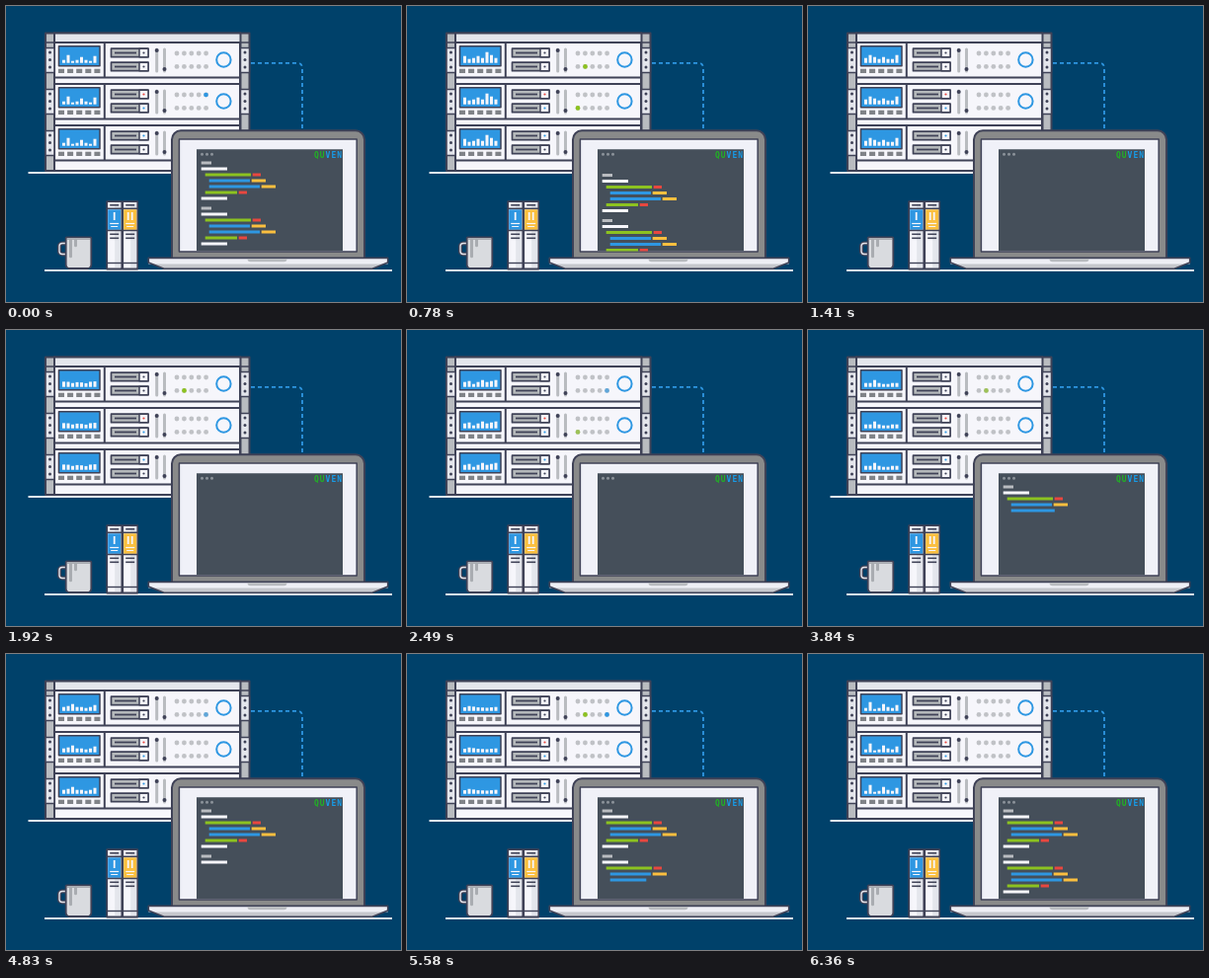
These frames come from a looping animation (400x300 px, 6.39 s). An HTML page with a canvas:

```html
<!DOCTYPE html>
<html lang="en">
<head>
<meta charset="utf-8">
<title>Server and laptop</title>
<style>
html, body { margin: 0; width: 100%; height: 100%; overflow: hidden; background: #00416a; }
canvas { display: block; width: 400px; height: 300px; }
</style>
</head>
<body>
<canvas id="stage" width="400" height="300"></canvas>
<script>
const ctx = document.getElementById('stage').getContext('2d');
const LOOP = 6390, STEP = 30;
const NAVY = '#00416a', INK = '#3f4257', WHITE = '#f6f6fb', PALE = '#e4e6ec';
const GREY = '#b9bcc0', BLUE = '#2e97e2', GREEN = '#8cc220', ORANGE = '#fbbf3f', RED = '#e8473f';
const SCREEN = '#454f5a', DARK = '#808388';

function box(x, y, w, h, fill, stroke, r = 0, lw = 2) {
  ctx.beginPath();
  ctx.roundRect(x, y, w, h, r);
  if (fill) { ctx.fillStyle = fill; ctx.fill(); }
  if (stroke) { ctx.strokeStyle = stroke; ctx.lineWidth = lw; ctx.stroke(); }
}

function dot(x, y, r, fill, stroke, lw = 2) {
  ctx.beginPath();
  ctx.arc(x, y, r, 0, Math.PI * 2);
  if (fill) { ctx.fillStyle = fill; ctx.fill(); }
  if (stroke) { ctx.strokeStyle = stroke; ctx.lineWidth = lw; ctx.stroke(); }
}

function line(points, color, lw = 2, cap = 'butt') {
  ctx.beginPath();
  points.forEach(([x, y], i) => i ? ctx.lineTo(x, y) : ctx.moveTo(x, y));
  ctx.strokeStyle = color;
  ctx.lineWidth = lw;
  ctx.lineCap = cap;
  ctx.stroke();
}

const across = (x1, x2, y, color, lw) => line([[x1, y], [x2, y]], color, lw);

// Piecewise linear lookup over [time, value] pairs.
function track(keys, t) {
  if (t <= keys[0][0]) return keys[0][1];
  for (let i = 1; i < keys.length; i++) {
    const [a, u] = keys[i - 1], [b, v] = keys[i];
    if (t <= b) return u + (v - u) * (t - a) / (b - a);
  }
  return keys[keys.length - 1][1];
}

// ---- Equalizer bars ----
const POSES = [
  [0,    [3, 8, 2, 3, 6, 3, 2, 7]],
  [780,  [7, 4, 5, 7, 5, 11, 8, 5]],
  [1410, [5, 8, 6, 4, 6, 4, 4, 8]],
  [2490, [5, 6, 3, 5, 7, 5, 6, 7]],
  [3840, [4, 4, 7, 4, 3, 3, 4, 4]],
  [4830, [4, 5, 7, 4, 4, 3, 4, 6]],
  [6360, [3, 9, 2, 3, 7, 4, 3, 6]]
];

function barHeight(i, t) {
  let k = 1;
  while (k < POSES.length - 1 && t > POSES[k][0]) k++;
  const [a, from] = POSES[k - 1], [b, to] = POSES[k];
  const u = Math.min(1, (t - a) / (b - a));
  const ease = (1 - Math.cos(Math.PI * u)) / 2;
  const sway = 2 * Math.sin(Math.PI * u * (2 + i % 3));
  return Math.max(2, Math.min(14, from[i] + (to[i] - from[i]) * ease + sway));
}

// ---- Blinking lights: x, y, colour, pulse centres ----
const LIGHTS = [
  [180.5, 61.4, GREEN, [780, 2000, 3700, 5500]],
  [173, 103.4, GREEN, [780, 2350, 4400]],
  [202.5, 61.4, BLUE, [1700, 2350, 3250, 4690, 5650]],
  [202.5, 90, BLUE, [0, 1080, 3000, 4250]]
];

function drawLights(t) {
  for (const [x, y, color, times] of LIGHTS) {
    const gap = Math.min(...times.map(c => Math.abs(t - c)));
    ctx.globalAlpha = Math.max(0, Math.min(1, (220 - gap) / 120));
    dot(x, y, 2.3, color);
    ctx.globalAlpha = 1;
  }
}

// ---- Code on the laptop ----
const BLOCK = [
  [198, 0, 10, GREY], [198, 6, 26, WHITE],
  [202, 12, 46, GREEN], [250, 12, 8, RED],
  [206, 18, 41, BLUE], [249, 18, 14, ORANGE],
  [206, 24, 51, BLUE], [259, 24, 14, ORANGE],
  [202, 30, 32, GREEN], [236, 30, 8, RED],
  [198, 36, 26, WHITE]
];
const CODE = [...BLOCK, ...BLOCK.map(([x, y, w, c]) => [x, y + 46, w, c])];
const TYPING = [[2720, 0], [3340, 3], [3840, 6.86], [4830, 13], [6262, 22]];

function drawCode(t) {
  if (t > 1350 && t < 2700) return;
  const typed = t < 2700 ? CODE.length : track(TYPING, t);
  const shift = t < 2700 ? track([[690, 0], [1350, 92]], t) : 0;
  ctx.save();
  ctx.beginPath();
  ctx.rect(193, 154, 148, 94.5);
  ctx.clip();
  CODE.forEach(([x, y, w, color], i) => {
    const part = Math.max(0, Math.min(1, typed - i));
    if (part) box(x - 0.3, 157.4 + y + shift, (w + 0.3) * part, 3.1, color);
  });
  ctx.restore();
}

// ---- Scene ----
function drawServer(y, t, lamps) {
  box(49, y, 188, 35.5, WHITE, INK);
  line([[99.8, y], [99.8, y + 35.5]], INK);

  box(53.5, y + 3.7, 41.5, 20, BLUE, INK, 0, 1.5);
  for (let i = 0; i < 8; i++) {
    const h = barHeight(i, t);
    box(57 + i * 4.5, y + 20.7 - h, 3, h, WHITE);
  }
  for (let i = 0; i < 5; i++) box(53 + i * 9.1, y + 26.7, 6, 4.3, DARK);

  [6.2, 20.2].forEach((d, i) => {
    box(106.5, y + d, 37.5, 8.5, '#b5b9bb', INK, 0, 1.7);
    across(110, 132, y + d + 4.3, INK, 1.8);
    box(135, y + d, 9, 8.5, WHITE, INK, 0, 1.5);
    dot(139.5, y + d + 4.3, 1.1, lamps[i]);
  });

  line([[152.7, y + 7], [152.7, y + 29]], GREY, 3, 'round');
  dot(152.7, y + 8, 2, INK);
  line([[160.5, y + 7], [160.5, y + 29]], GREY, 3, 'round');
  dot(160.5, y + 27, 2, INK);

  for (let i = 0; i < 5; i++) {
    const x = 173 + i * 7.4;
    dot(x, y + 11, 2.4, '#c0c2c6');
    dot(x, y + 24.4, 2.4, '#c0c2c6');
  }
  dot(220.4, y + 17.5, 7.2, WHITE, BLUE, 2);
}

function drawRack(t) {
  const rows = [37, 79, 121];
  const lamps = [[INK, INK], [RED, BLUE], [BLUE, INK]];
  box(49, 27.5, 188, 139.5, WHITE, INK);
  box(49, 27.5, 188, 9.5, PALE);
  across(48, 238, 27.5, INK);
  rows.forEach((y, i) => drawServer(y, t, lamps[i]));
  for (const x of [40, 237.5]) {
    box(x, 27.5, 9, 139.5, GREY, INK);
    across(x, x + 9, 37, INK, 1.5);
    for (const y of rows) {
      box(x, y + 5.5, 9, 25, PALE, INK, 0, 1.5);
      for (const d of [10, 17.5, 25]) dot(x + 4.5, y + d, 1.5, INK);
    }
  }
  across(22.5, 169, 169, '#e6e9ee', 1.8);
}

function drawCable() {
  ctx.setLineDash([4, 3]);
  ctx.beginPath();
  ctx.moveTo(248, 57.8);
  ctx.lineTo(295, 57.8);
  ctx.quadraticCurveTo(300, 57.8, 300, 63);
  ctx.lineTo(300, 126);
  ctx.strokeStyle = BLUE;
  ctx.lineWidth = 1.8;
  ctx.lineCap = 'butt';
  ctx.stroke();
  ctx.setLineDash([]);
}

function drawBase() {
  const base = new Path2D('M144.3 255.4H386.7V260L371 266.3H160L144.3 260Z');
  ctx.fillStyle = '#c6c8cd';
  ctx.fill(base);
  box(144.3, 255.4, 242.4, 6, '#eeeff5');
  ctx.strokeStyle = INK;
  ctx.lineWidth = 1.6;
  ctx.lineJoin = 'round';
  ctx.stroke(base);
  box(244.5, 256, 40, 3.2, GREY, null, [0, 0, 3, 3]);
}

function drawLaptop(t) {
  box(168, 126.3, 195, 135, '#898a8a', INK, [9, 9, 0, 0]);
  box(175.4, 135, 179.8, 114, '#f0f1f8', INK, 0, 1.5);
  box(193, 145.3, 148, 103, SCREEN);
  for (const x of [198.5, 203.5, 208.5]) dot(x, 150.3, 1.5, '#8b929a');

  ctx.font = 'bold 8px "DejaVu Sans Mono", monospace';
  ctx.letterSpacing = '1px';
  ctx.textBaseline = 'alphabetic';
  ctx.fillStyle = '#20b423';
  ctx.fillText('QU', 312, 154);
  ctx.fillStyle = '#179ce8';
  ctx.fillText('VEN', 323.6, 154);

  drawCode(t);
  drawBase();
}

function drawMug() {
  box(54, 240.5, 9, 11, null, INK, 3, 4.2);
  box(54, 240.5, 9, 11, null, PALE, 3, 1.4);
  box(60.7, 234.3, 25.6, 31.7, '#d9dbdf', INK, [1, 1, 4, 4], 1.8);
  box(64, 235.3, 3, 20, '#a9acb1', null, 1.5);
  box(69, 235.3, 3, 9, '#a9acb1', null, 1.5);
  across(62, 85, 236.2, '#a9acb1', 1.6);
}

function drawBook(x, color, strokes) {
  box(x, 198.2, 15, 68.3, WHITE, INK, 0, 1.8);
  box(x + 8, 199, 6, 66, PALE);
  across(x, x + 15, 205.3, INK, 1.6);
  across(x + 3, x + 12, 201.8, INK, 1.6);
  box(x + 1, 206.3, 13, 20.5, color);
  for (const s of strokes) box(x + 7.5 + s - 0.9, 209, 1.8, 8, WHITE);
  across(x + 3, x + 12, 220.5, WHITE, 1.2);
  across(x + 4, x + 11, 223.5, WHITE, 1);
  across(x, x + 15, 227.5, INK, 1.5);
  across(x + 3, x + 12, 231.3, INK, 1.6);
  across(x + 3, x + 12, 235.3, INK, 1.6);
  across(x, x + 15, 260.5, INK, 1.4);
}

function draw(t) {
  ctx.fillStyle = NAVY;
  ctx.fillRect(0, 0, 400, 300);
  drawRack(t);
  drawLights(t);
  drawCable();
  across(39, 391, 268, '#dfe3e8', 1.9);
  drawMug();
  drawBook(102.2, BLUE, [0]);
  drawBook(118.2, ORANGE, [-2, 2]);
  drawLaptop(t);
}

const start = performance.now();
function tick() {
  let t = Math.floor((performance.now() - start) % LOOP / STEP) * STEP;
  if (t > 1950 && t < 2040) t = 1950;
  draw(t);
  requestAnimationFrame(tick);
}
tick();
</script>
</body>
</html>
```
